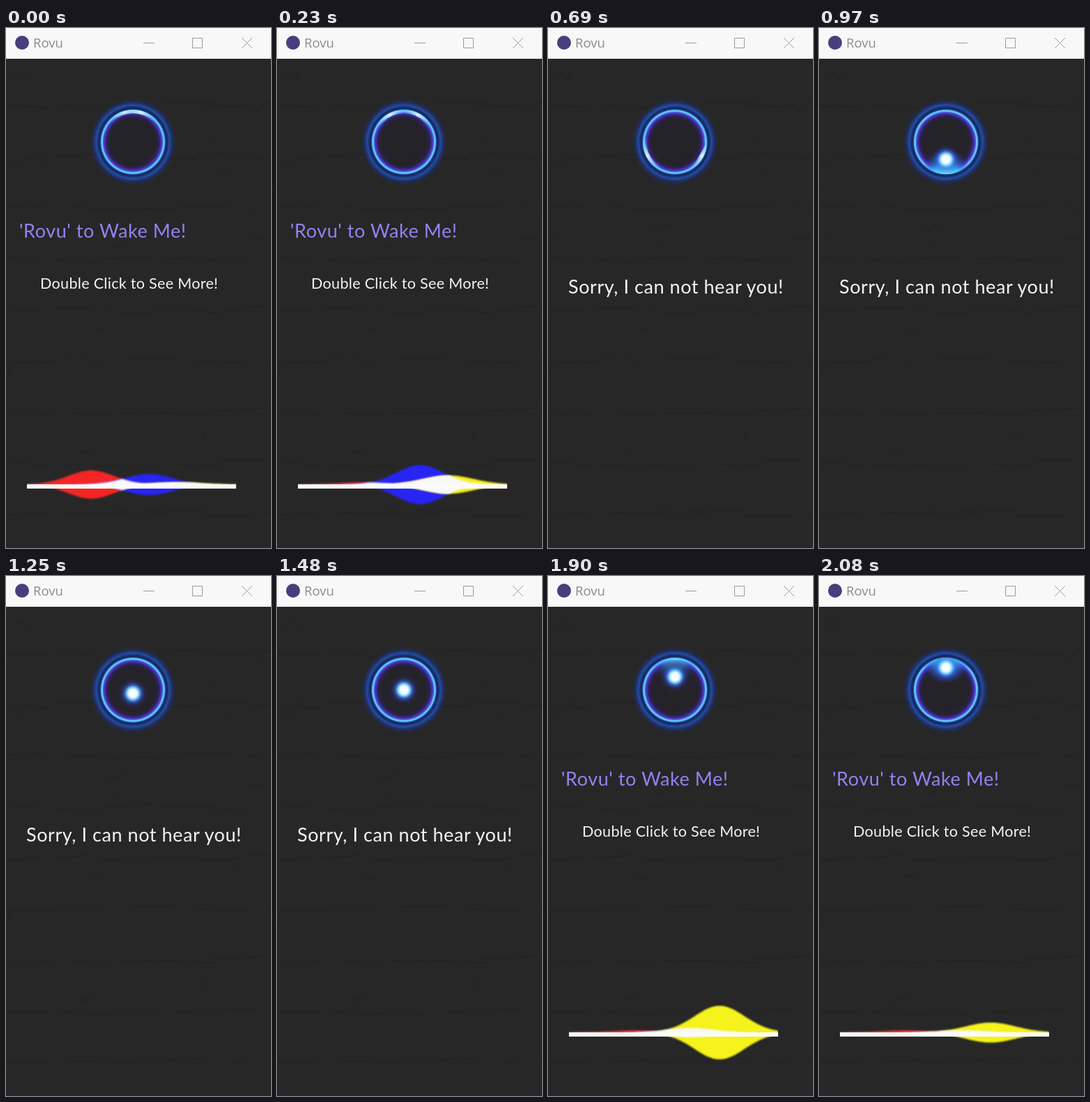
Animation, 380 px wide and 744 px high, one loop 2.12 s. Source, as an HTML page with a canvas:

```html
<!DOCTYPE html>
<html lang="en">
<head>
<meta charset="utf-8">
<title>Rovu</title>
<style>
  html, body { margin: 0; width: 100%; height: 100%; overflow: hidden; background: #272727; }
  canvas, svg { position: absolute; left: 0; top: 0; width: 380px; height: 744px; }
  .ui { font: 18.5px "Open Sans", "Noto Sans", sans-serif; }
  .say { font: 27px Lato, "Open Sans", sans-serif; letter-spacing: 0.56px; }
  .say .small { font-size: 21.6px; letter-spacing: 0.28px; }
</style>
</head>
<body>
<canvas id="stage" width="380" height="744"></canvas>
<svg viewBox="0 0 380 744">
  <text class="ui" x="39" y="28" fill="#8c8c8c">Rovu</text>
  <g class="say" id="idle">
    <text x="19" y="300" fill="#9482f2">'Rovu' to Wake Me!</text>
    <text class="small" x="49" y="373" fill="#f4f4f4">Double Click to See More!</text>
  </g>
  <text class="say" id="sorry" x="29" y="380" fill="#f4f4f4">Sorry, I can not hear you!</text>
</svg>
<script>
const W = 380, H = 744, LOOP = 2120, STEPS = 46;
const HIDE = 690, SHOW = 1810;
const CX = 182, CY = 163, R = 45;
const ctx = document.getElementById('stage').getContext('2d');
const idle = document.getElementById('idle');
const sorry = document.getElementById('sorry');

const clamp = v => Math.max(0, Math.min(1, v));

// piecewise linear path through [time, value] points
function track(points, t) {
  for (let i = 1; i < points.length; i++) {
    const [t0, a] = points[i - 1], [t1, b] = points[i];
    if (t <= t1) return a + (b - a) * clamp((t - t0) / (t1 - t0));
  }
  return points[points.length - 1][1];
}

function random(seed) {
  return () => (seed = (seed * 16807) % 2147483647) / 2147483647;
}

function drawWall(c) {
  const rnd = random(71);
  c.fillStyle = '#272727';
  c.fillRect(0, 0, W, H);

  const crack = (x, y, len, dx, dy, style) => {
    c.beginPath();
    c.moveTo(x, y);
    for (let i = 0; i < len; i++) {
      x += dx * (0.5 + rnd());
      y += dy + (rnd() - 0.5) * 2.5;
      c.lineTo(x, y);
    }
    c.strokeStyle = style;
    c.stroke();
  };

  c.filter = 'blur(1px)';
  for (let row = 0; row < 10; row++) {
    const y = 40 + row * 73;
    for (let x = -10; x < W; x += 55 + rnd() * 50) {
      const yy = y + (rnd() - 0.5) * 8 - x * 0.01;
      crack(x, yy, 8, 9, 0, 'rgba(0,0,0,0.17)');
      crack(x, yy + 2.5, 8, 9, 0, 'rgba(255,255,255,0.03)');
    }
  }
  for (let i = 0; i < 36; i++) {
    const dark = rnd() < 0.6;
    crack(rnd() * W, 50 + rnd() * 680, 3 + rnd() * 5, (rnd() - 0.4) * 7, (rnd() - 0.5) * 4,
      dark ? 'rgba(0,0,0,0.2)' : 'rgba(255,255,255,0.035)');
  }
  c.filter = 'none';
}

function drawBar(c) {
  c.fillStyle = '#f8f8f8';
  c.fillRect(0, 0, W, 44);
  c.fillStyle = '#4a3d7c';
  c.beginPath();
  c.arc(23, 21, 10, 0, 7);
  c.fill();
  c.strokeStyle = '#9a9a9a';
  c.lineWidth = 1;
  c.beginPath();
  c.moveTo(197, 21.5); c.lineTo(213, 21.5);
  c.rect(267.5, 14.5, 14, 14);
  c.moveTo(338, 14); c.lineTo(353, 29);
  c.moveTo(353, 14); c.lineTo(338, 29);
  c.stroke();
}

const back = document.createElement('canvas');
back.width = W;
back.height = H;
drawWall(back.getContext('2d'));
drawBar(back.getContext('2d'));

function radial(x, y, r0, r, stops) {
  const g = ctx.createRadialGradient(x, y, r0, x, y, r);
  stops.forEach(([at, color]) => g.addColorStop(at, color));
  ctx.fillStyle = g;
  ctx.beginPath();
  ctx.arc(x, y, r, 0, 7);
  ctx.fill();
}

function drawOrb(t) {
  // halo, then inner glow, then the bright rim
  radial(CX, CY, 0, 63, [
    [0.7, 'rgba(20,45,125,0)'], [0.72, 'rgba(20,45,125,0.8)'], [0.78, 'rgba(18,42,110,0.72)'],
    [0.83, 'rgba(33,88,205,0.78)'], [0.86, 'rgba(30,75,185,0.65)'], [0.91, 'rgba(24,52,140,0.4)'],
    [1, 'rgba(24,40,110,0)']
  ]);
  radial(CX, CY, 0, R, [
    [0, 'rgba(36,34,40,0.6)'], [0.72, 'rgba(36,33,42,0.8)'], [0.83, '#2b2156'],
    [0.92, '#4a38c4'], [1, '#4d6cf0']
  ]);
  radial(CX, CY, 41.5, 47.5, [
    [0, 'rgba(80,110,255,0)'], [0.3, 'rgba(90,180,250,0.75)'], [0.52, '#6cdcff'],
    [0.72, 'rgba(70,170,250,0.8)'], [1, 'rgba(40,90,220,0)']
  ]);

  // two lights sliding down the rim from the top
  const angle = track([[0, 0.25], [230, 0.48], [510, 0.95], [800, 2.7], [900, 3.14]], t);
  const rim = t < 1000 ? clamp((1000 - t) / 100) : 0;
  if (rim > 0) {
    ctx.save();
    ctx.globalAlpha = rim;
    ctx.beginPath();
    ctx.arc(CX, CY, 46, 0, 7);
    ctx.arc(CX, CY, 41, 0, 7, true);
    ctx.clip('evenodd');
    for (const side of [-1, 1]) {
      radial(CX + side * Math.sin(angle) * 44, CY - Math.cos(angle) * 44, 0, 27, [
        [0, 'rgba(235,252,255,0.9)'], [0.45, 'rgba(160,228,255,0.55)'], [1, 'rgba(70,190,255,0)']
      ]);
    }
    ctx.restore();
  }

  // glowing drop rising through the disc
  if (t > 780) {
    const y = track([[780, 222], [970, 188], [1250, 168], [1710, 158], [2080, 131], [2120, 127]], t);
    const edge = clamp((Math.abs(y - CY) - 13) / 12);
    ctx.save();
    ctx.beginPath();
    ctx.arc(CX, CY, 46, 0, 7);
    ctx.clip();
    if (edge > 0) {
      ctx.globalAlpha = edge;
      radial(CX, y > CY ? 208 : 118, 0, 36, [
        [0, 'rgba(110,232,255,0.98)'], [0.42, 'rgba(60,200,252,0.9)'],
        [0.7, 'rgba(45,120,240,0.5)'], [1, 'rgba(50,50,200,0)']
      ]);
      ctx.globalAlpha = 1;
    }
    radial(CX, y, 0, 22, [
      [0, '#fff'], [0.26, '#effcff'], [0.4, 'rgba(130,210,255,0.95)'],
      [0.58, 'rgba(50,105,240,0.6)'], [0.78, 'rgba(45,50,160,0.25)'], [1, 'rgba(40,40,130,0)']
    ]);
    ctx.restore();
  }
}

const bumps = [
  { x: 122, spread: 33, peak: -120, color: '#f52525' },
  { x: 205, spread: 34, peak: 144, color: '#2824f2' },
  { x: 246, spread: 36, peak: 386, color: '#f6f21c' }
];
const bell = (d, s) => Math.exp(-d * d / (2 * s * s));

function band(half, color) {
  ctx.beginPath();
  for (let x = 30; x <= 330; x += 2) ctx.lineTo(x, 653 - half(x));
  for (let x = 330; x >= 30; x -= 2) ctx.lineTo(x, 653.5 + half(x));
  ctx.fillStyle = color;
  ctx.fill();
}

function drawWave(t) {
  const size = b => 3 + 37 * bell(t - b.peak, 96);
  const height = (b, x) => size(b) * bell(x - b.x, b.spread);
  ctx.save();
  ctx.beginPath();
  ctx.rect(30, 600, 300, 110);
  ctx.clip();
  ctx.filter = 'blur(1.3px)';
  for (const b of bumps) band(x => height(b, x), b.color);
  // overlapping colours add up to white
  band(x => bumps.map(b => height(b, x)).sort((a, b) => b - a)[1], '#f8f8f8');
  ctx.restore();
  ctx.fillStyle = '#fbfbfb';
  ctx.fillRect(30, 653, 300, 6);
}

function draw(t) {
  const quiet = t >= HIDE && t < SHOW;
  ctx.drawImage(back, 0, 0);
  drawOrb(t);
  if (!quiet) drawWave(t < HIDE ? t : t - 1545);
  idle.style.display = quiet ? 'none' : '';
  sorry.style.display = quiet ? '' : 'none';
}

const stepTime = n => Math.round(n * 4.63) * 10;
const start = performance.now();

function tick() {
  const t = (performance.now() - start) % LOOP;
  let n = STEPS - 1;
  while (n > 0 && stepTime(n) > t) n--;
  draw(stepTime(n));
  requestAnimationFrame(tick);
}
tick();
</script>
</body>
</html>
```
